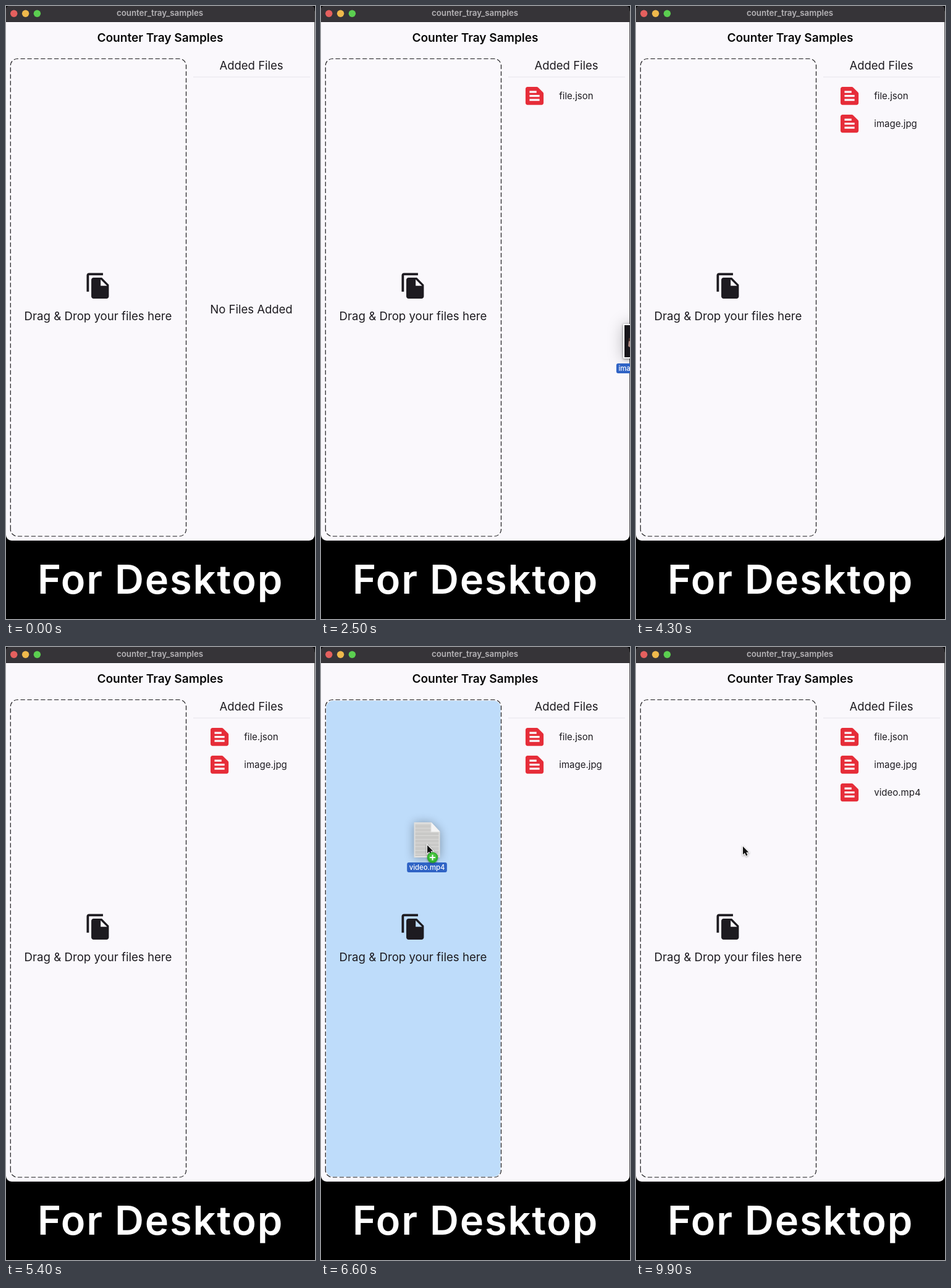
Animation, 500 px wide and 993 px high, one loop 10000 ms. Source, as an HTML page with a canvas:

```html
<!DOCTYPE html>
<html lang="en">
<head>
<meta charset="utf-8">
<title>Drop files</title>
<style>
  html, body { margin: 0; height: 100%; overflow: hidden; background: #000; }
  canvas { display: block; }
</style>
</head>
<body>
<canvas width="500" height="993"></canvas>
<script>
const ctx = document.querySelector('canvas').getContext('2d');
const LOOP = 10000, STEP = 100;
const INK = '#1d1b20', PAPER = '#faf8fc';

// x, y is the centre of the name label; tip is the pointer offset from it
const drags = [
  { name: 'file.json', start: 500, rest: 1500, drop: 1600, from: [402, 500], to: [209, 408.6], tip: [12, -36], badgeAt: 0 },
  { name: 'image.jpg', start: 2500, rest: 3500, drop: 3800, from: [508, 587], to: [239, 420], tip: [-4, -61], badgeAt: 3400, photo: true },
  { name: 'video.mp4', start: 5500, rest: 6600, drop: 6700, from: [432, 490], to: [171.5, 357], tip: [0.5, -36], badgeAt: 0 }
];

const copyIcon = new Path2D('M16 1H4c-1.1 0-2 .9-2 2v14h2V3h12V1zm-1 4l6 6v10c0 1.1-.9 2-2 2H7.99C6.89 23 6 22.1 6 21l.01-14c0-1.1.89-2 1.99-2h7zm-1 7h5.5L14 6.5V12z');
const noteIcon = new Path2D('M20.41 8.41l-4.83-4.83C15.21 3.21 14.7 3 14.17 3H5c-1.1 0-2 .9-2 2v14c0 1.1.9 2 2 2h14c1.1 0 2-.9 2-2V9.83c0-.53-.21-1.04-.59-1.42zM7 7h7v2H7V7zm10 10H7v-2h10v2zm0-4H7v-2h10v2z');
const arrow = new Path2D('M0 0V13.2L3 10.4L5.2 15.2L7.5 14.1L5.3 9.5H9.3Z');

// Clockwise from the lower left corner, where the dashes begin
const border = new Path2D('M7.3 848V96.5A11 11 0 0 1 18.3 85.5H280.5A11 11 0 0 1 291.5 96.5V848A11 11 0 0 1 280.5 859H18.3A11 11 0 0 1 7.3 848Z');

function text(str, x, y, size, color, weight = 400, align = 'center', spacing = 0) {
  ctx.font = `${weight} ${size}px Inter, sans-serif`;
  ctx.letterSpacing = spacing + 'px';
  ctx.textAlign = align;
  ctx.fillStyle = color;
  ctx.fillText(str, x, y);
}

function box(x, y, w, h, color, radius = 0) {
  ctx.beginPath();
  ctx.roundRect(x, y, w, h, radius);
  ctx.fillStyle = color;
  ctx.fill();
}

function disc(x, y, r, color) {
  ctx.beginPath();
  ctx.arc(x, y, r, 0, 7);
  ctx.fillStyle = color;
  ctx.fill();
}

function icon(path, x, y, scale, color) {
  ctx.save();
  ctx.translate(x, y);
  ctx.scale(scale, scale);
  ctx.fillStyle = color;
  ctx.fill(path);
  ctx.restore();
}

function withShadow(color, blur, draw) {
  ctx.save();
  ctx.shadowColor = color;
  ctx.shadowBlur = blur;
  ctx.shadowOffsetY = 1;
  draw();
  ctx.restore();
}

function pointer(x, y) {
  ctx.save();
  ctx.translate(x, y);
  ctx.lineWidth = 2;
  ctx.strokeStyle = '#fff';
  withShadow('#0006', 3, () => ctx.stroke(arrow));
  ctx.fillStyle = '#111';
  ctx.fill(arrow);
  ctx.restore();
}

function badge(x, y) {
  withShadow('#0006', 3, () => disc(x, y, 8.7, '#2fae2c'));
  disc(x, y - 1, 6.5, '#48c43e');
  box(x - 4.5, y - 1, 9, 2, '#fff');
  box(x - 1, y - 4.5, 2, 9, '#fff');
}

function sheet(x, y) {
  withShadow('#0005', 16, () => {
    ctx.fillStyle = '#dededd';
    ctx.fill(new Path2D(`M${x} ${y}h28l14 15v42h-42z`));
  });
  for (let row = 3; row < 55; row += 2) {
    box(x + 2, y + row, row < 16 ? 25 : 38, 0.9, row % 3 ? '#b5b4b2' : '#c6c5c3');
  }
  ctx.fillStyle = '#f4f4f4';
  ctx.fill(new Path2D(`M${x + 28} ${y}v15h14z`));
}

function photo(x, y) {
  withShadow('#0004', 26, () => box(x, y, 38.5, 56, '#fff', 1));
  withShadow('#0007', 4, () => box(x, y, 38.5, 56, '#fff', 1));
  box(x + 2, y + 2, 34.5, 52, '#17151a');
  ctx.fillStyle = '#4a3029';
  ctx.fill(new Path2D(`M${x + 9} ${y + 23}l19 -3l8 9v16l-11 -6l-9 2l-8 -5z`));
  ctx.fillStyle = '#a98780';
  ctx.fill(new Path2D(`M${x + 9} ${y + 28}l8 -1l3 7l-5 6l-7 -4z`));
}

function label(name, x, y) {
  ctx.font = '500 11.3px Inter, sans-serif';
  ctx.letterSpacing = '0px';
  const w = ctx.measureText(name).width + 7;
  box(x - w / 2, y - 8, w, 16, '#2f63c5', 3);
  text(name, x, y + 4, 11.3, '#fff', 500);
}

function place(d, t) {
  const ease = 1 - (1 - Math.min(1, (t - d.start) / (d.rest - d.start))) ** 3;
  const [x, y] = d.from.map((v, i) => v + (d.to[i] - v) * ease);
  return { x, y, tipX: x + d.tip[0], tipY: y + d.tip[1] };
}

function windowFrame() {
  ctx.fillStyle = '#000';
  ctx.fillRect(0, 0, 500, 993);
  box(0, 0, 499.3, 866, PAPER, 9);
  box(0, 0, 499.3, 26, '#363438', [5, 5, 0, 0]);
  box(0, 25, 499.3, 1, '#29272b');
  ['#e5605e', '#efb94c', '#5bcf50'].forEach((c, i) => disc(12.8 + i * 18.8, 12.2, 5.7, c));
  text('counter_tray_samples', 249, 16, 13.3, '#b5b3b6', 600);
  text('Counter Tray Samples', 249.5, 58, 19.1, '#080808', 600);
  text('For Desktop', 250, 952, 65, '#fff', 600, 'center', 1.8);
}

function draw(t) {
  const held = drags.find(d => t >= d.start && t < d.drop);
  const pos = held && place(held, t);
  const hover = held && pos.tipX < 291;
  const added = drags.filter(d => t >= d.drop);

  windowFrame();
  if (hover) box(8.5, 87, 282, 771, '#bedcfa', 11);
  ctx.lineWidth = 1.2;
  ctx.strokeStyle = '#1b1a1d';
  ctx.setLineDash([7.27, 3.63]);
  ctx.stroke(border);
  ctx.setLineDash([]);
  icon(copyIcon, 126.7, 430.6, 1.89, INK);
  text('Drag & Drop your files here', 149, 509, 18.65, INK);

  text('Added Files', 397, 103, 18.5, INK);
  box(303, 114.5, 189, 1, '#e8e6eb');
  if (!added.length) text('No Files Added', 397, 498, 18.5, INK);
  added.forEach((d, i) => {
    icon(noteIcon, 326.1, 126.2 + i * 45, 1.62, '#e62d39');
    text(d.name, 385.3, 150.5 + i * 45, 15, INK, 400, 'left');
  });

  if (held) {
    if (held.photo) photo(pos.x - 19, pos.y - 72);
    else sheet(pos.x - 21, pos.y - 73);
    label(held.name, pos.x, pos.y);
    pointer(pos.tipX, pos.tipY);
    if (hover && t >= held.badgeAt) badge(pos.tipX + 8.5, pos.tipY + 20);
  } else if (added.length === drags.length) {
    pointer(173, 323);
  }
}

const begin = performance.now();
function tick() {
  const t = (performance.now() - begin) % LOOP;
  draw(Math.floor(t / STEP) * STEP);
  requestAnimationFrame(tick);
}
tick();
</script>
</body>
</html>
```
